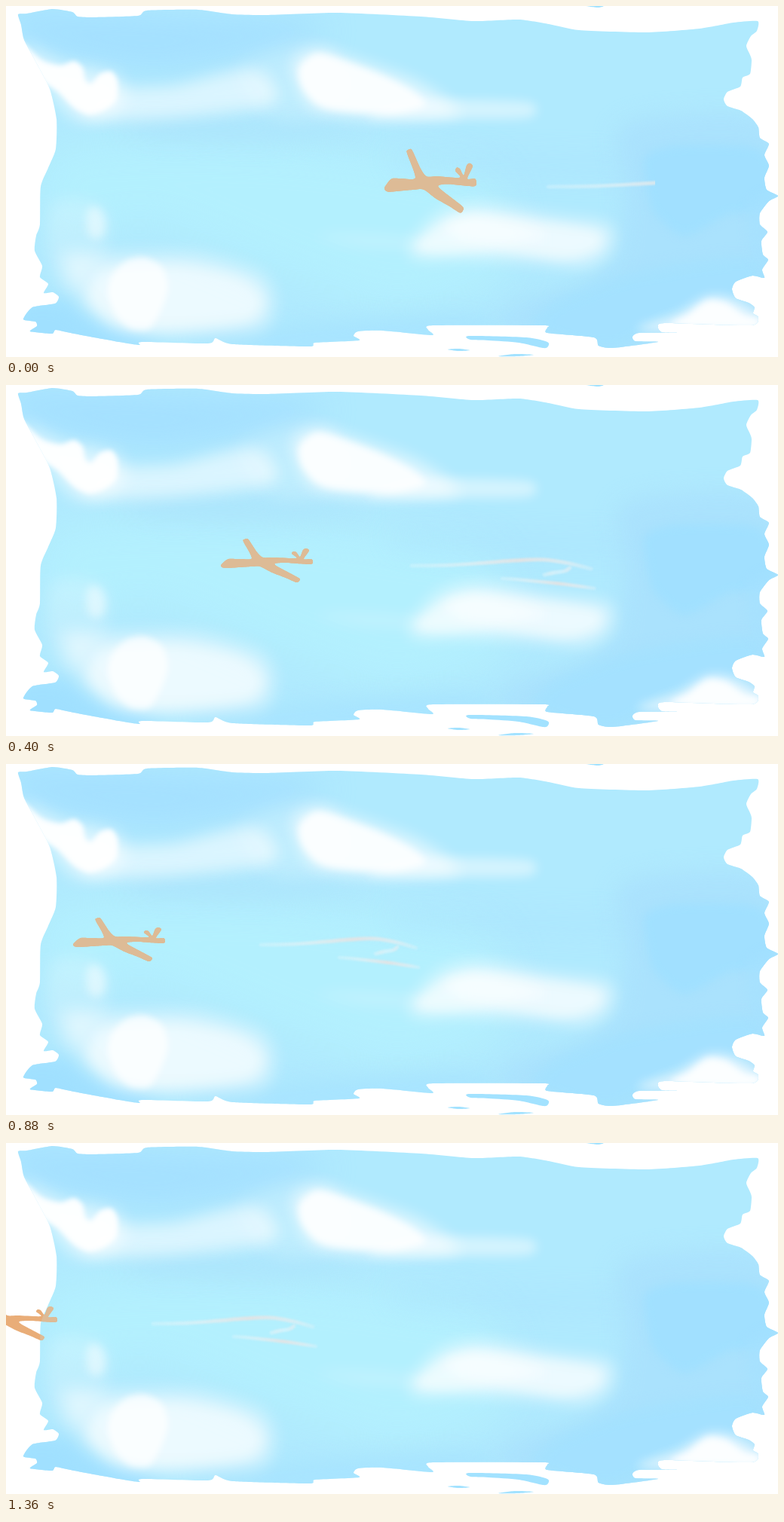
Recreate the animation shown at these times as an HTML page with a canvas. Size 1024 by 466 pixels, loop 1440 ms.

```html
<!DOCTYPE html>
<html lang="en">
<head>
<meta charset="utf-8">
<title>Plane in the sky</title>
<style>
html, body { margin: 0; width: 100%; height: 100%; overflow: hidden; background: #fff; }
canvas { display: block; width: 1024px; height: 466px; }
</style>
</head>
<body>
<canvas id="stage" width="1024" height="466"></canvas>
<script>
const W = 1024, H = 466, LOOP = 1440, STEP = 80;
const ctx = document.getElementById('stage').getContext('2d');

// Rounded path through "x,y x,y ..." points
function curve(text, closed = true, k = 0.13) {
  const pts = text.trim().split(/\s+/).map(p => p.split(',').map(Number));
  const n = pts.length;
  const at = i => closed ? pts[(i + n) % n] : pts[Math.max(0, Math.min(n - 1, i))];
  const path = new Path2D();
  path.moveTo(...pts[0]);
  for (let i = 0; i < (closed ? n : n - 1); i++) {
    const [a, b, c, d] = [at(i - 1), at(i), at(i + 1), at(i + 2)];
    path.bezierCurveTo(
      b[0] + (c[0] - a[0]) * k, b[1] + (c[1] - a[1]) * k,
      c[0] - (d[0] - b[0]) * k, c[1] - (d[1] - b[1]) * k, c[0], c[1]);
  }
  if (closed) path.closePath();
  return path;
}

const edges = {
  top: `16,11 28,10 62,4 88,8 95,14 115,15 175,13 187,6 255,5 300,11 345,12 440,9 550,14
    620,20 680,18 720,24 760,32 850,35 920,30 965,22 997,20`,
  right: `996,33 988,40 982,53 987,65 989,72 987,90 977,95 974,107 957,114 952,124 957,133
    975,139 990,150 998,161 1000,175 1012,183 1006,198 1012,212 1006,228 1009,244 1024,252
    1012,259 1000,275 1000,290 1010,300 1002,312 1004,330 1011,337 1003,350 1006,361
    990,358 968,366 963,376 968,388 985,394 993,400 991,408 998,413`,
  bottom: `988,424 873,421 865,427 870,433 892,434 840,434 831,439 835,445 865,446 805,454
    786,451 780,440 718,434 718,427 712,424 566,424 560,430 565,437 500,431 467,432 461,438
    468,444 410,447 402,452 300,449 278,441 268,448 180,446 177,450 150,446 90,435 66,430
    61,435 32,432`,
  left: `41,425 39,419 23,416 35,400 65,395 70,386 62,380 50,381 56,369 45,360 48,345
    38,325 40,305 45,290 46,240 56,215 66,190 67,150 58,110 40,75 24,45 20,25`
};
const sky = curve(Object.values(edges).join(' '), true, 0.1);
const drips = [
  '615,438 690,440 718,446 719,452 712,454 680,447 640,444 616,443',
  '586,456 600,455 615,457 600,458',
  '653,465 675,462 700,463 680,465',
  '770,0 792,0 786,2 775,1'
].map(s => curve(s));

// color, alpha, blur, outline
const tints = [
  ['#b4f2fe', .8, 26, '70,190 330,180 520,200 640,230 660,350 520,400 380,360 200,290 60,300'],
  ['#a3deff', .85, 22, '10,5 210,10 400,18 410,45 330,65 200,85 90,70 20,50'],
  ['#abe3fd', .7, 14, '160,150 380,155 480,170 350,180 200,175'],
  ['#a9e2ff', .45, 16, '520,195 700,200 850,205 840,225 700,222 540,215'],
  ['#aae1fd', .85, 14, '810,170 850,148 990,145 1030,200 1030,430 800,470 660,440 670,395 760,370 810,330 820,230'],
  ['#a0e0ff', .9, 6, '848,200 890,186 990,188 1020,215 1015,270 960,276 900,305 860,275 850,240'],
  ['#a2e1ff', .7, 9, '730,390 830,355 960,335 1010,345 970,400 880,420 800,460 700,430'],
  ['#9fdfff', .9, 12, '10,395 75,390 120,420 200,445 180,465 10,460'],
  ['#a4e2ff', .6, 12, '240,440 480,415 620,410 640,440 400,465'],
  ['#a5e1ff', .6, 7, '985,265 1020,255 1020,345 990,335']
];
const clouds = [
  ['#fff', .6, 11, '20,50 70,75 120,85 150,95 155,130 120,150 85,145 55,105'],
  ['#fff', .95, 3, '18,46 48,72 72,79 90,73 102,82 105,98 113,103 125,90 140,87 148,100 146,125 130,138 110,144 90,135 68,113 45,96'],
  ['#fff', .55, 10, '120,112 220,106 300,86 340,88 360,115 340,135 200,150 105,148'],
  ['#fff', .2, 12, '310,80 390,50 440,70 430,140 370,150 330,130'],
  ['#fff', .6, 10, '380,75 415,56 460,70 540,98 585,125 600,145 520,150 440,146 400,130'],
  ['#fff', .85, 5, '389,82 412,63 448,72 500,92 540,113 556,132 510,143 440,139 412,130 392,107'],
  ['#fff', .45, 7, '530,126 600,124 695,128 695,148 600,150 480,149'],
  ['#fff', .5, 10, '535,318 575,275 630,262 720,278 800,290 802,325 765,346 680,338 600,335 545,335'],
  ['#fff', .5, 7, '545,318 580,288 630,276 720,288 785,300 785,322 740,335 650,325 570,328'],
  ['#fff', .5, 8, '582,290 620,279 680,290 720,305 660,316 600,310'],
  ['#fff', .18, 9, '410,305 470,302 550,308 560,322 470,320'],
  ['#fff', .2, 10, '60,262 110,258 135,280 130,330 80,380 55,330'],
  ['#fff', .45, 6, '108,272 120,266 131,280 131,300 120,310 108,300'],
  ['#fff', .5, 11, '75,330 130,330 250,330 335,355 355,390 335,430 200,437 140,425 95,385'],
  ['#fff', .5, 8, '130,350 230,345 310,362 340,390 320,418 220,430 150,425 110,390'],
  ['#fff', .75, 4, '140,358 160,338 185,334 208,348 215,375 205,405 190,428 165,428 145,410 135,382'],
  ['#fff', .6, 7, '843,425 890,408 930,385 965,388 1000,410 995,430 850,432'],
  ['#fff', .9, 4, '885,424 905,409 930,391 955,394 980,410 1000,415 990,428']
];

function makeBackdrop() {
  const c = document.createElement('canvas');
  c.width = W;
  c.height = H;
  const g = c.getContext('2d');
  g.fillStyle = '#a2e2ff';
  drips.forEach(p => g.fill(p));
  g.clip(sky);
  g.fillStyle = '#b0eafe';
  g.fillRect(0, 0, W, H);
  for (const [color, alpha, blur, shape] of [...tints, ...clouds]) {
    g.globalAlpha = alpha;
    g.filter = `blur(${blur}px)`;
    g.fillStyle = color;
    g.fill(curve(shape));
  }
  return c;
}
const backdrop = makeBackdrop();

// Relative to the nose; y is measured from the fuselage axis at 235
const plane = curve(`0,5 3,1 10,-4 25,-4 41,-5 30,-27 31,-30 35,-31 38,-28 48,-13 56,-6 70,-6
  100,-5 94,-11 96,-14 100,-13 105,-7 109,-16 113,-18 117,-15 110,-4 120,-4 122,0 118,3
  85,1 72,2 75,6 103,21 104,25 100,27 86,21 68,14 52,6 40,6 6,8`);

const trails = [
  { path: curve('3,240 50,239 90,236 125,233 160,232 190,237 215,244', false, .17), from: 0, to: 218, w: 5 },
  { path: curve('110,257 135,259 180,264 219,270', false, .17), from: 108, to: 221, w: 4.5 },
  { path: curve('160,252 172,249 184,247 190,243', false, .17), from: 155, to: 194, w: 5, pale: true }
];

// Smooth curve through [time, value] keys
function track(keys, t) {
  let i = keys.findIndex(k => k[0] > t) - 1;
  if (i < 0) i = keys.length - 2;
  const slope = j => {
    const a = keys[Math.max(0, j - 1)], b = keys[Math.min(keys.length - 1, j + 1)];
    return (b[1] - a[1]) / (b[0] - a[0]);
  };
  const [t0, v0] = keys[i], [t1, v1] = keys[i + 1], d = t1 - t0, u = (t - t0) / d;
  return v0 * (1 + 2 * u) * (1 - u) ** 2 + slope(i) * d * u * (1 - u) ** 2
    + v1 * u * u * (3 - 2 * u) + slope(i + 1) * d * u * u * (u - 1);
}
function linear(keys, t) {
  const i = Math.max(1, keys.findIndex(k => k[0] >= t));
  const [t0, v0] = keys[i - 1], [t1, v1] = keys[i];
  return v0 + (v1 - v0) * (t - t0) / (t1 - t0);
}
const planeX = [[0, 502], [160, 407], [400, 285], [560, 213], [880, 89], [1200, -9], [1360, -54]];
const trailX = [[0, 716], [160, 653], [400, 535], [560, 472], [880, 335], [1200, 238], [1360, 192]];
const trailScale = [[0, 1.4], [160, 1.33], [400, 1.12], [560, 1], [880, .97], [1200, 1.25], [1360, 1]];
const planeScale = [[0, 1.46], [160, 1], [1360, 1]];

function drawTrails(t) {
  ctx.save();
  ctx.beginPath();
  ctx.rect(0, 0, 861, H);
  ctx.clip();
  ctx.translate(track(trailX, t), 0);
  ctx.scale(linear(trailScale, t), 1);
  ctx.lineCap = 'round';
  ctx.filter = 'blur(1.2px)';
  for (const { path, from, to, w, pale } of trails) {
    const fade = ctx.createLinearGradient(from, 0, to, 0);
    fade.addColorStop(0, 'rgba(225,246,253,.35)');
    fade.addColorStop(.3, 'rgba(226,240,244,.7)');
    fade.addColorStop(.6, pale ? 'rgba(225,245,252,.6)' : 'rgba(226,227,228,.95)');
    fade.addColorStop(.85, 'rgba(226,236,240,.75)');
    fade.addColorStop(1, 'rgba(225,243,250,.35)');
    ctx.strokeStyle = fade;
    ctx.lineWidth = w;
    ctx.stroke(path);
  }
  ctx.restore();
}

function drawPlane(t, color) {
  ctx.save();
  ctx.translate(track(planeX, t), 235);
  ctx.scale(1, linear(planeScale, t));
  ctx.fillStyle = color;
  ctx.fill(plane);
  ctx.restore();
}

function draw(t) {
  ctx.fillStyle = '#fff';
  ctx.fillRect(0, 0, W, H);
  ctx.drawImage(backdrop, 0, 0);
  drawPlane(t, '#e9ad78');
  ctx.save();
  ctx.clip(sky);
  drawTrails(t);
  drawPlane(t, '#ddbb96');
  ctx.restore();
}

function tick() {
  draw(Math.floor(performance.now() % LOOP / STEP) * STEP);
  requestAnimationFrame(tick);
}
tick();
</script>
</body>
</html>
```
